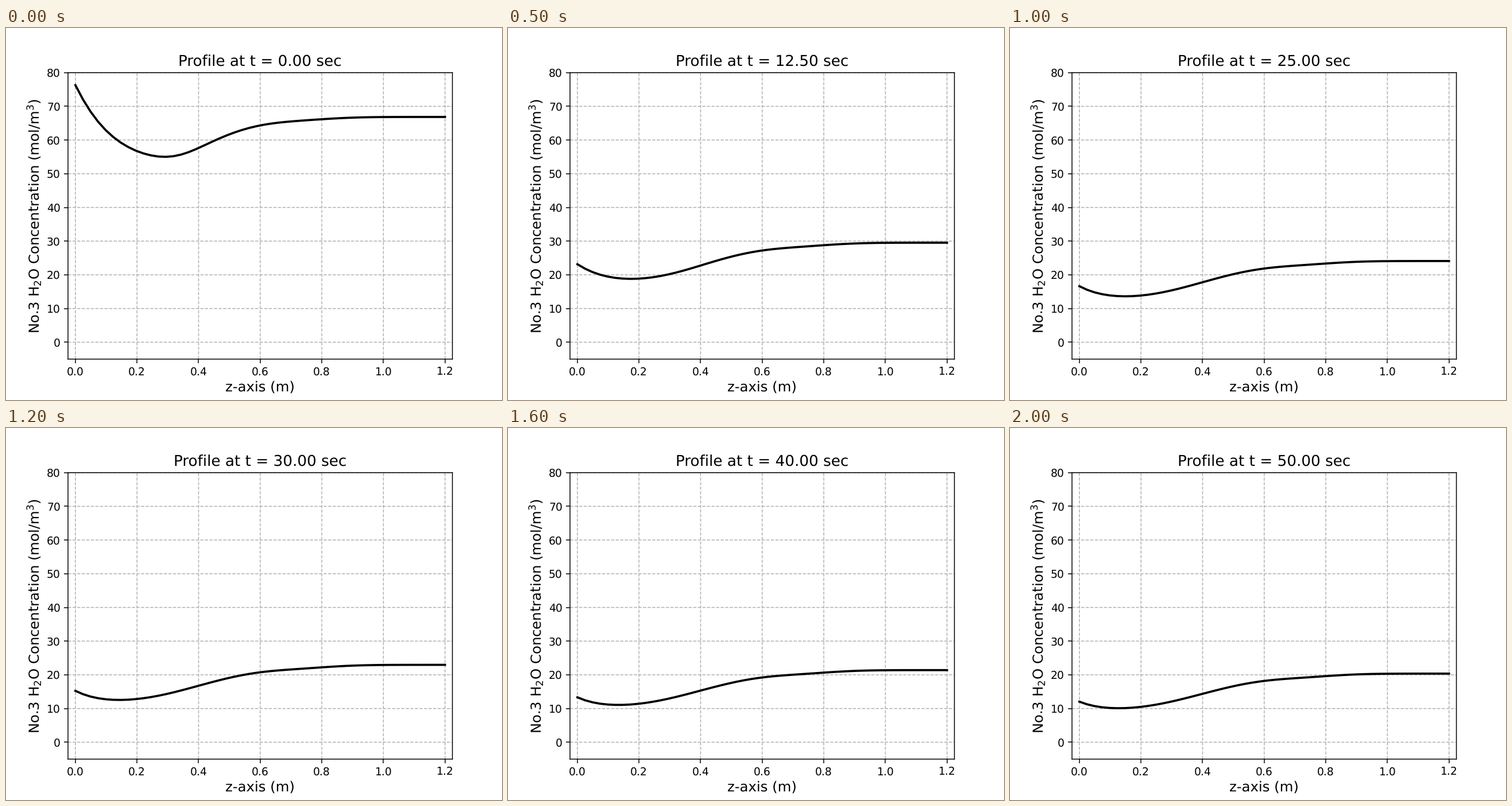
These frames come from a looping animation (864 px wide and 648 px high, 2100 ms). A matplotlib script:

```python
import numpy as np
import matplotlib.pyplot as plt
from matplotlib.animation import FuncAnimation

FRAMES, STEP = 21, 2.5      # frames per loop, simulated seconds per frame
LENGTH, NODES = 1.2, 50     # column length (m), plotted nodes

plt.rcParams["text.hinting"] = "none"


def decay(t, rest, drop, tau, power=1):
    """Fall from rest + drop towards rest, fast at first and then ever slower."""
    return rest + drop * (1 + t / tau) ** -power


def profile(z, t):
    """Outlet level, less a dip around the inlet, plus a sharp rise at z = 0."""
    inlet = decay(t, 3, 73.3, 1.8, 0.623)
    outlet = decay(t, 14, 52.85, 2.8, 0.721)
    depth = decay(t, 10.3, 9.7, 4.6)
    width = decay(t, 0.4845, -0.041, 4.6)
    reach = 0.072 + 0.085 * np.exp(-t / 15)

    dip = depth * np.exp(-(z / width) ** 2.6)
    shoulder = 0.6 * np.exp(-((z - 0.73) / 0.15) ** 2)
    rise = (inlet - outlet + depth) * np.exp(-z / reach - (z / 0.32) ** 5)
    return outlet - dip - shoulder + rise


z = np.linspace(0, LENGTH, NODES)

fig, ax = plt.subplots(figsize=(6.4, 4.8), dpi=135)
line, = ax.plot(z, profile(z, 0), color="black", lw=2)
title = ax.set_title("", fontsize=14)
ax.set_xlabel("z-axis (m)", fontsize=13, labelpad=3.5)
ax.set_ylabel("No.3 H$_2$O Concentration (mol/m$^3$)", fontsize=13, labelpad=3.5)
ax.set_xlim(-0.02 * LENGTH, 1.02 * LENGTH)
ax.set_ylim(-5, 80)
ax.grid(linestyle="--")

# Keep thin lines at their exact sub-pixel places.
for thin in [*ax.get_xgridlines(), *ax.get_ygridlines(), *ax.spines.values()]:
    thin.set_snap(False)


def update(i):
    t = STEP * i
    line.set_ydata(profile(z, t))
    title.set_text(f"Profile at t = {t:.2f} sec")
    return line, title


anim = FuncAnimation(fig, update, frames=FRAMES, interval=100, repeat=True, repeat_delay=0)
plt.show()
```
